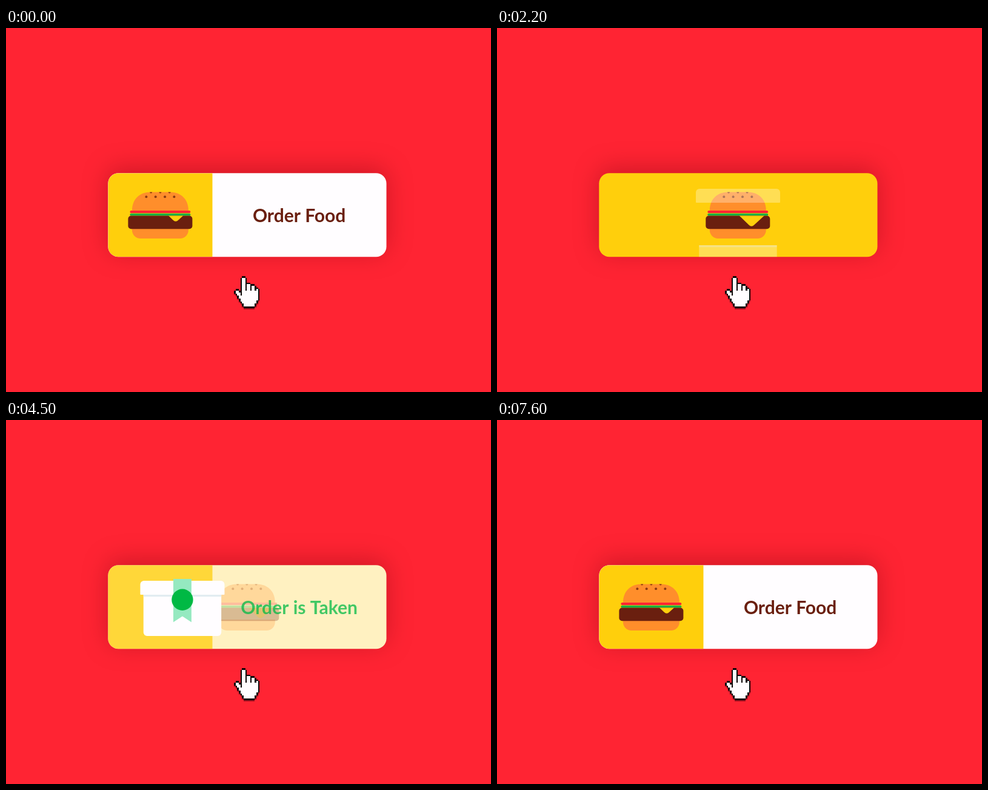
These frames come from a looping animation (800 px wide and 600 px high, 7700 ms). An HTML page with a canvas:

```html
<!DOCTYPE html>
<html lang="en">
<head>
<meta charset="utf-8">
<title>Order button</title>
<style>
  html, body { margin: 0; width: 100%; height: 100%; overflow: hidden; background: #ff2433; }
  canvas { display: block; width: 800px; height: 600px; }
</style>
</head>
<body>
<canvas id="stage" width="800" height="600"></canvas>
<script>
const ctx = document.getElementById('stage').getContext('2d');

const LOOP = 7700, STEP = 100, DURATION = 650;
const RED = '#ff2433', YELLOW = [255, 207, 12], WHITE = [255, 253, 255];
const BROWN = '#6a1f0f', ORANGE = '#ff8e2b', GREEN = '#00b944', MINT = '#95e9c0';
const CARD = { x: 168.3, y: 239.3, w: 459.2, h: 138, r: 17, cx: 397.9, cy: 308.3 };
const PANEL_W = 172.2, LEFT_X = 254.4, MID_X = 397.3;
const HAND_PIXEL = 2.65;

// Filled parts of the hand in pixel units: x, y, width, height.
const HAND = [
  [5, 1, 2, 10], [8, 5, 2, 5], [11, 6, 2, 4], [14, 8, 1, 7],
  [5, 9, 9, 8], [6, 17, 7, 2],
  [1, 9, 2, 2], [2, 10, 2, 2], [3, 12, 3, 2], [4, 14, 2, 2]
];

const lerp = (a, b, p) => a + (b - a) * p;
const rgb = c => `rgb(${c.map(Math.round).join()})`;
const mix = (a, b, p) => rgb(a.map((v, i) => lerp(v, b[i], p)));

// Ease-out curve, cubic-bezier(0, 0, .58, 1).
function ease(x) {
  if (x <= 0) return 0;
  if (x >= 1) return 1;
  let lo = 0, hi = 1;
  for (let i = 0; i < 20; i++) {
    const u = (lo + hi) / 2;
    if (3 * u * u * (1 - u) * 0.58 + u ** 3 < x) lo = u; else hi = u;
  }
  return 3 * lo * lo * (1 - lo) + lo ** 3;
}

function layer(alpha, draw) {
  if (alpha <= 0) return;
  ctx.save();
  ctx.globalAlpha = alpha;
  draw();
  ctx.restore();
}

function box(x, y, w, h, r, color) {
  ctx.fillStyle = color;
  ctx.beginPath();
  ctx.roundRect(x, y, w, h, r);
  ctx.fill();
}

function disc(x, y, r, color) {
  ctx.fillStyle = color;
  ctx.beginPath();
  ctx.arc(x, y, r, 0, Math.PI * 2);
  ctx.fill();
}

function scaleAround(x, y, s) {
  ctx.translate(x, y);
  ctx.scale(s, s);
  ctx.translate(-x, -y);
}

function drawShadow() {
  ctx.save();
  ctx.shadowColor = 'rgba(120, 0, 15, .36)';
  ctx.shadowBlur = 42;
  ctx.shadowOffsetX = 2000;
  ctx.shadowOffsetY = -7;
  box(CARD.x - 2000, CARD.y, CARD.w, CARD.h, CARD.r, '#000');
  ctx.restore();
}

function drawBurger(x, scale, melt) {
  ctx.translate(x, CARD.cy);
  ctx.scale(scale, scale);
  ctx.translate(0, -CARD.cy);

  ctx.save();
  ctx.fillStyle = ORANGE;
  ctx.beginPath();
  ctx.moveTo(-46.5, 301);
  ctx.bezierCurveTo(-46.5, 282, -34, 270.5, -16, 270.5);
  ctx.lineTo(16, 270.5);
  ctx.bezierCurveTo(34, 270.5, 46.5, 282, 46.5, 301);
  ctx.closePath();
  ctx.fill();
  ctx.clip();
  for (const dx of [-15.3, 0, 15.3]) disc(dx, 270.6, 2, '#8a3a10');
  for (const dx of [-23, -7.7, 7.7, 23]) disc(dx, 278.3, 2, '#8a3a10');
  ctx.restore();

  box(-50, 301, 100, 4, 2, RED);
  box(-50, 305.8, 100, 3.8, 1.9, '#10b045');
  box(-46.5, 329, 93, 18, [0, 0, 14, 14], ORANGE);
  box(-53, 309.5, 106, 21.7, 5, BROWN);

  ctx.beginPath();
  ctx.rect(-53, 309.5, 106, 22);
  ctx.clip();
  ctx.translate(lerp(3, 0, melt), lerp(-8, 0, melt));
  ctx.fillStyle = rgb(YELLOW);
  ctx.beginPath();
  ctx.moveTo(1, 308);
  ctx.lineTo(18, 324.5);
  ctx.quadraticCurveTo(22.5, 329, 27, 324.5);
  ctx.lineTo(45, 308);
  ctx.closePath();
  ctx.fill();
}

function drawText(text, color, scale) {
  scaleAround(CARD.cx, CARD.cy, scale);
  ctx.font = '700 30px Lato, sans-serif';
  ctx.textAlign = 'center';
  ctx.textBaseline = 'alphabetic';
  ctx.fillStyle = color;
  ctx.fillText(text, 483.6, 319.6);
}

function drawBox(x, lift) {
  const top = lerp(388, 288, lift);
  box(x - 64.2, top, 128.4, 68, [0, 0, 6, 6], rgb(WHITE));
  box(x - 64.2, top, 128.4, 3.2, 0, '#e2ecf1');
  box(x - 69.5, 265, 139, 23, [6, 6, 1, 1], rgb(WHITE));
}

function drawSeal(x, appear, grow, check) {
  const half = lerp(11.8, 16, grow) * lerp(0.75, 1, appear);
  const bottom = lerp(262, lerp(319.5, 338, grow), lerp(0.75, 1, appear));
  const notch = bottom - lerp(8, 10.5, grow);
  ctx.fillStyle = MINT;
  ctx.beginPath();
  ctx.moveTo(x - half, 262);
  ctx.lineTo(x + half, 262);
  ctx.lineTo(x + half, bottom);
  ctx.lineTo(x, notch);
  ctx.lineTo(x - half, bottom);
  ctx.closePath();
  ctx.fill();

  const cy = lerp(289.6, 298.5, grow);
  const r = lerp(lerp(15, 18.6, grow), 21.8, check) * lerp(0.75, 1, appear);
  disc(x, cy, r, GREEN);

  layer(ctx.globalAlpha * check, () => {
    ctx.translate(x, cy);
    ctx.scale(r / 21.8, r / 21.8);
    ctx.strokeStyle = rgb(WHITE);
    ctx.lineWidth = 4.2;
    ctx.lineCap = ctx.lineJoin = 'round';
    ctx.beginPath();
    ctx.moveTo(-9, 1);
    ctx.lineTo(-3, 7);
    ctx.lineTo(10, -6.5);
    ctx.stroke();
  });
}

function handRect(x, y, w, h, top) {
  const px = v => Math.round(v * HAND_PIXEL);
  ctx.fillRect(376 + px(x), top + px(y), px(x + w) - px(x), px(y + h) - px(y));
}

function drawHand(top) {
  const outline = y0 => {
    for (const [x, y, w, h] of HAND) {
      handRect(x - 1, y, w + 2, h, y0);
      handRect(x, y - 1, w, h + 2, y0);
    }
  };
  ctx.fillStyle = '#b01020';
  outline(top + 2);
  ctx.fillStyle = '#0a0506';
  outline(top);
  ctx.fillStyle = rgb(WHITE);
  for (const part of HAND) handRect(...part, top);
}

function draw(time) {
  const from = start => ease((time - start) / DURATION);
  const press = from(350), center = from(1277), pack = from(2074), seal = from(3000);
  const taken = from(4137), check = from(5150), reset = from(6130);

  const pressed = 1 - 0.04 * press;
  const scale = lerp(pressed, 1, center);
  const labelScale = taken > 0 ? 1 : pressed;

  ctx.globalAlpha = 1;
  ctx.fillStyle = RED;
  ctx.fillRect(0, 0, 800, 600);
  drawShadow();

  ctx.save();
  const w = CARD.w * scale, h = CARD.h * scale;
  box(CARD.cx - w / 2, CARD.cy - h / 2, w, h, CARD.r * scale, mix(WHITE, YELLOW, center * (1 - taken)));
  ctx.clip();

  layer(taken > 0 ? taken : 1 - center, () => {
    scaleAround(CARD.cx, CARD.cy, labelScale);
    box(CARD.x, CARD.y, PANEL_W, CARD.h, [CARD.r, 0, 0, CARD.r], rgb(YELLOW));
  });

  const back = reset > 0;
  layer(back ? reset : 1 - taken, () => {
    const start = CARD.cx + (LEFT_X - CARD.cx) * pressed;
    drawBurger(back ? LEFT_X : lerp(start, MID_X, center), scale, back ? 0 : press);
  });
  layer(back ? reset : 1 - center, () => drawText('Order Food', BROWN, back ? 1 : pressed));
  layer(taken * (1 - reset), () => drawText('Order is Taken', GREEN, 1));

  const boxX = lerp(397.5, 254.5, taken);
  layer(pack * (1 - reset), () => drawBox(boxX, pack));
  layer(seal * (1 - reset), () => drawSeal(boxX, seal, taken, check));
  ctx.restore();

  drawHand(Math.round(lerp(409, 341, press - center)));
}

function tick() {
  const time = performance.now() % LOOP;
  draw(Math.floor(time / STEP) * STEP);
  requestAnimationFrame(tick);
}
tick();
</script>
</body>
</html>
```
